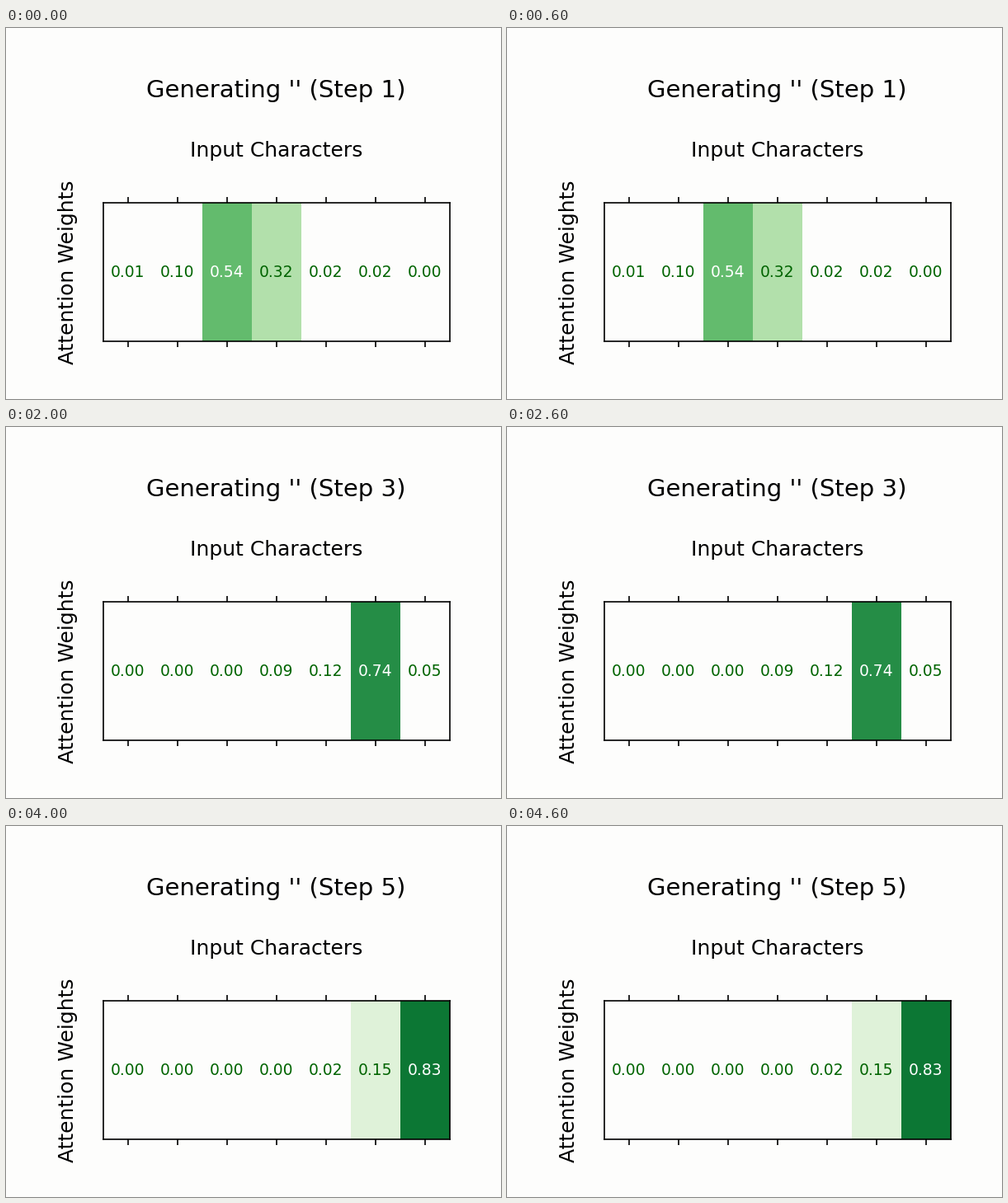
Write a matplotlib script that moves like this. It is 600 px wide and 450 px high and loops after 5 s.

```python
import numpy as np
import matplotlib.pyplot as plt
from matplotlib.animation import FuncAnimation

W, H, DPI = 600, 450, 150
PAGE = "#fdfdfc"
FAINT = 0.13  # weights below this blend into the page
CELLS = 7


def bump(height, center, sharpness=2.7):
    """Gaussian attention around one input position."""
    x = np.arange(CELLS)
    return height * np.exp(-sharpness * (x - center) ** 2)


# Each step is one strong focus plus, at times, weak echoes elsewhere.
weights = [
    bump(0.583, 2.263, 1.1045) + bump(0.006, 0) + bump(0.02, 5),
    bump(0.797, 2.564, 1.95),
    bump(0.74, 5) + bump(0.155, 3.45),
    bump(0.921, 5.625) + bump(0.034, 3.8),
    bump(0.83, 6, 1.71) + bump(0.02, 4),
]

plt.rcParams["font.family"] = "DejaVu Sans"
fig = plt.figure(figsize=(W / DPI, H / DPI), dpi=DPI, facecolor=PAGE)
ax = fig.add_axes([118 / W, 70 / H, 420 / W, 168 / H], facecolor=PAGE)

cmap = plt.get_cmap("Greens").copy()
cmap.set_bad(PAGE)
image = ax.imshow(np.zeros((1, CELLS)), cmap=cmap, vmin=0, vmax=1,
                  aspect="auto", interpolation="nearest")
ax.set_xticks(range(CELLS))
ax.set_yticks([])
ax.tick_params(axis="x", top=True, bottom=True,
               labeltop=False, labelbottom=False)

values = [ax.text(i, 0, "", ha="center", va="center", fontsize=9)
          for i in range(CELLS)]


def label(x, y, text, size, **kw):
    """Place text at pixel coordinates measured from the top left."""
    return fig.text(x / W, 1 - y / H, text, fontsize=size, **kw)


title = label(327, 84, "", 14, ha="center", va="baseline")
label(328, 156, "Input Characters", 12, ha="center", va="baseline")
label(87, 295.87, "Attention Weights", 12, ha="right", va="center",
      rotation=90)


def update(step):
    row = weights[step]
    image.set_data(np.ma.masked_less(row[None, :], FAINT))
    for text, w in zip(values, row):
        text.set_text(f"{w:.2f}")
        text.set_color("white" if w > 0.5 else "darkgreen")
    title.set_text(f"Generating '' (Step {step + 1})")
    return [image, title, *values]


anim = FuncAnimation(fig, update, frames=len(weights), interval=1000,
                     repeat=True, repeat_delay=0, blit=False)
plt.show()
```
